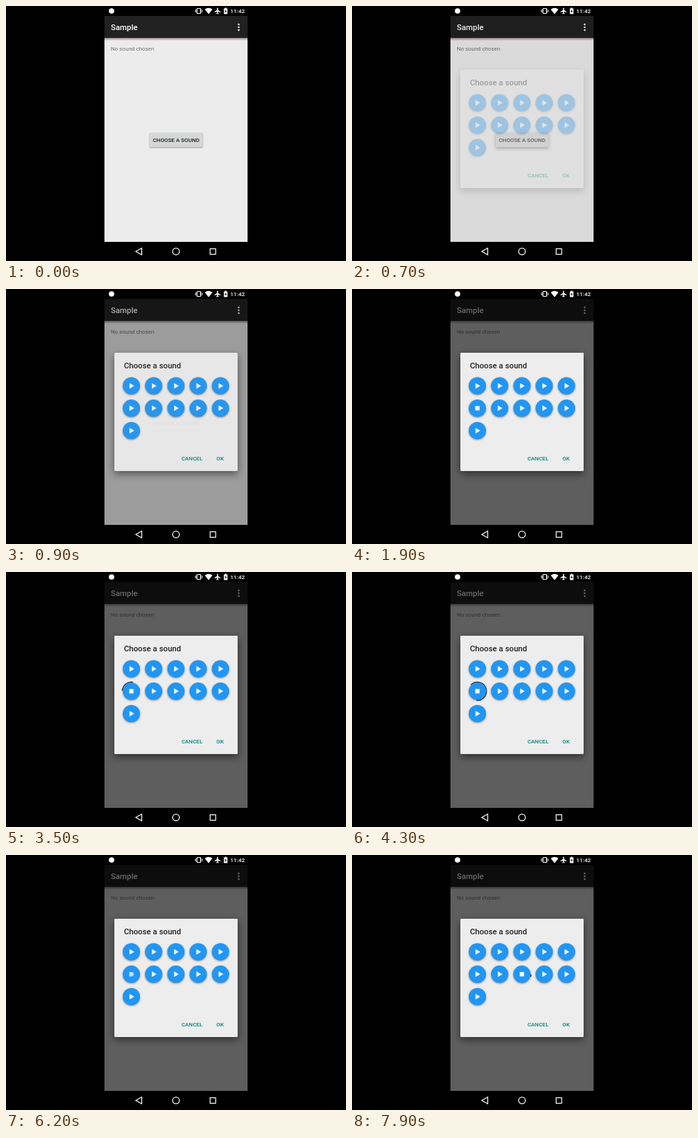
Write an HTML page with a canvas that moves like this. It is 480 px wide and 360 px high and loops after 8000 ms.

```html
<!DOCTYPE html>
<html lang="en">
<head>
<meta charset="utf-8">
<title>Sound chooser</title>
<style>
  html, body { margin: 0; width: 100%; height: 100%; overflow: hidden; background: #000; }
  canvas { display: block; width: 480px; height: 360px; }
</style>
</head>
<body>
<canvas id="stage"></canvas>
<script>
const LOOP = 8000, W = 480, H = 360, TAU = Math.PI * 2;
const FONT = 'Roboto, "Noto Sans", sans-serif';
const scale = window.devicePixelRatio || 1;

function setUp(canvas) {
  canvas.width = W * scale;
  canvas.height = H * scale;
  const g = canvas.getContext('2d');
  g.scale(scale, scale);
  return g;
}

const stage = setUp(document.getElementById('stage'));
const layer = document.createElement('canvas');
const sheet = setUp(layer);

const clamp = v => Math.max(0, Math.min(1, v));
const ramp = (t, from, to) => clamp((t - from) / (to - from));
const mix = (a, b, u) => a + (b - a) * u;
const decel = u => 1 - (1 - u) * (1 - u);

function text(g, str, x, y, size, color, weight = 400) {
  g.font = `${weight} ${size}px ${FONT}`;
  g.fillStyle = color;
  g.fillText(str, x, y);
}

function disc(g, x, y, r, color) {
  g.fillStyle = color;
  g.beginPath();
  g.arc(x, y, r, 0, TAU);
  g.fill();
}

function poly(g, pts, color, line) {
  g.beginPath();
  pts.forEach(([x, y]) => g.lineTo(x, y));
  g.closePath();
  if (line) {
    g.strokeStyle = color;
    g.lineWidth = line;
    g.stroke();
  } else {
    g.fillStyle = color;
    g.fill();
  }
}

function card(g, x, y, w, h, r, color, blur, drop, shade) {
  g.save();
  g.shadowColor = `rgba(0,0,0,${shade})`;
  g.shadowBlur = blur * scale;
  g.shadowOffsetY = drop * scale;
  g.fillStyle = color;
  g.beginPath();
  g.roundRect(x, y, w, h, r);
  g.fill();
  g.restore();
}

function statusBar(g) {
  disc(g, 149, 7, 3.8, '#fff');

  // vibrate
  g.strokeStyle = '#fff';
  g.lineWidth = 1;
  g.strokeRect(270, 3.5, 4.4, 7);
  g.fillStyle = '#fff';
  for (const d of [-1, 1]) {
    g.fillRect(272.2 + d * 3.6 - 0.4, 4.3, 0.8, 5.4);
    g.fillRect(272.2 + d * 5 - 0.4, 5.5, 0.8, 3);
  }

  // signal fan
  g.beginPath();
  g.moveTo(286, 11.4);
  g.lineTo(280.6, 4.8);
  g.quadraticCurveTo(286, 0.9, 291.4, 4.8);
  g.closePath();
  g.fill();

  // plane
  const half = [[0, -4.6], [0.8, -3.9], [0.8, -1.3], [4.2, 1], [4.2, 2],
                [0.8, 0.9], [0.8, 3], [1.8, 3.8], [1.8, 4.6], [0, 4]];
  const mirror = half.map(([x, y]) => [-x, y]).reverse();
  poly(g, half.concat(mirror).map(([x, y]) => [298.6 + x, 7 + y]), '#fff');

  // battery
  g.fillRect(307.6, 3.4, 5, 8);
  g.fillRect(309, 2.5, 2.2, 1);
  poly(g, [[310.5, 4.6], [308.7, 7.8], [309.9, 7.8], [309.6, 10.2], [311.5, 6.9], [310.3, 6.9]], '#000');

  text(g, '11:42', 316.6, 10.3, 8.1, '#fff', 500);
}

function navBar(g) {
  poly(g, [[183.2, 346.5], [191.6, 341.8], [191.6, 351.2]], '#fff', 1.2);
  g.beginPath();
  g.arc(240, 346.5, 4.7, 0, TAU);
  g.stroke();
  g.strokeRect(288.2, 342.7, 7.8, 7.8);
}

function screen(g, t) {
  g.fillStyle = '#000';
  g.fillRect(0, 0, W, H);
  g.fillStyle = '#ececec';
  g.fillRect(139, 45, 202, 288);

  const fade = g.createLinearGradient(0, 45, 0, 49);
  fade.addColorStop(0, 'rgba(70,45,55,0.55)');
  fade.addColorStop(1, 'rgba(70,45,55,0)');
  g.fillStyle = fade;
  g.fillRect(139, 45, 202, 4);
  g.fillStyle = '#212121';
  g.fillRect(139, 14, 202, 31);

  text(g, 'Sample', 148, 34, 11.22, '#fff', 500);
  for (const y of [26, 30, 34]) disc(g, 328.5, y, 1.25, '#fff');
  text(g, 'No sound chosen', 148, 63, 7.86, '#717171');

  const press = ramp(t, 450, 550);
  card(g, 203, 179.3, 74.4, 20, 1.2, '#d6d7d7', 2 + press * 2, 0.8 + press * 0.8, 0.4);
  text(g, 'CHOOSE A SOUND', 207.2, 192.4, 7.86, '#212121', 500);
}

// Thin arc travelling round a playing button
function ring(g, x, y, age) {
  if (age < 0 || age > 4050) return;
  let tail, sweep;
  if (age < 1060) {
    tail = mix(-16, 165, age / 1060);
    sweep = 15;
  } else if (age < 3100) {
    const u = ramp(age, 1060, 3100);
    tail = mix(165, 270, u);
    sweep = 15 + 270 * decel(u);
  } else {
    const u = ramp(age, 3100, 4050);
    tail = 270 + 45 * u + 270 * decel(u);
    sweep = 285 - 270 * decel(u);
  }
  const tint = ramp(age, 1400, 3100);
  g.strokeStyle = `rgb(${mix(28, 16, tint)},${mix(34, 72, tint)},${mix(42, 120, tint)})`;
  g.lineWidth = 1.2;
  g.beginPath();
  g.arc(x, y, 12.9, tail * TAU / 360, (tail + sweep) * TAU / 360);
  g.stroke();
}

function soundButton(g, x, y, playing, age) {
  g.save();
  g.shadowColor = 'rgba(0,0,0,0.42)';
  g.shadowBlur = 2.6 * scale;
  g.shadowOffsetY = 1 * scale;
  disc(g, x, y, 12.2, '#2196f3');
  g.restore();
  ring(g, x, y, age);

  g.save();
  g.globalAlpha = 1 - playing;
  poly(g, [[x - 2.6, y - 4], [x + 4, y], [x - 2.6, y + 4]], '#f4f8fc');
  g.globalAlpha = playing;
  g.fillStyle = '#f4f8fc';
  g.fillRect(x - 3.1, y - 3.1, 6.2, 6.2);
  g.restore();
}

function dialog(g, t) {
  g.clearRect(0, 0, W, H);
  card(g, 153, 90, 174, 167, 1.2, '#ededed', 11, 4, 0.5);
  text(g, 'Choose a sound', 166.4, 112, 11.22, '#212121', 500);

  const first = ramp(t, 1740, 1880) * (1 - ramp(t, 6120, 6320));
  const second = ramp(t, 7400, 7600);
  for (let i = 0; i < 11; i++) {
    const x = 177 + (i % 5) * 31.45;
    const y = 136.7 + Math.floor(i / 5) * 31.6;
    if (i === 5) soundButton(g, x, y, first, t - 2100);
    else if (i === 7) soundButton(g, x, y, second, t - 7800);
    else soundButton(g, x, y, 0, -1);
  }

  text(g, 'CANCEL', 247.7, 242.2, 7.86, '#00897b', 500);
  text(g, 'OK', 297, 242.2, 7.86, '#00897b', 500);
}

function draw(t) {
  screen(stage, t);
  const shown = decel(ramp(t, 640, 990));
  if (shown > 0) {
    stage.fillStyle = `rgba(0,0,0,${0.6 * ramp(t, 640, 1097)})`;
    stage.fillRect(139, 14, 202, 319);
    dialog(sheet, t);
    stage.globalAlpha = shown;
    stage.drawImage(layer, 0, 0, W, H);
    stage.globalAlpha = 1;
  }
  statusBar(stage);
  navBar(stage);
}

const begin = performance.now();
function tick() {
  draw((performance.now() - begin) % LOOP);
  requestAnimationFrame(tick);
}
tick();
</script>
</body>
</html>
```
